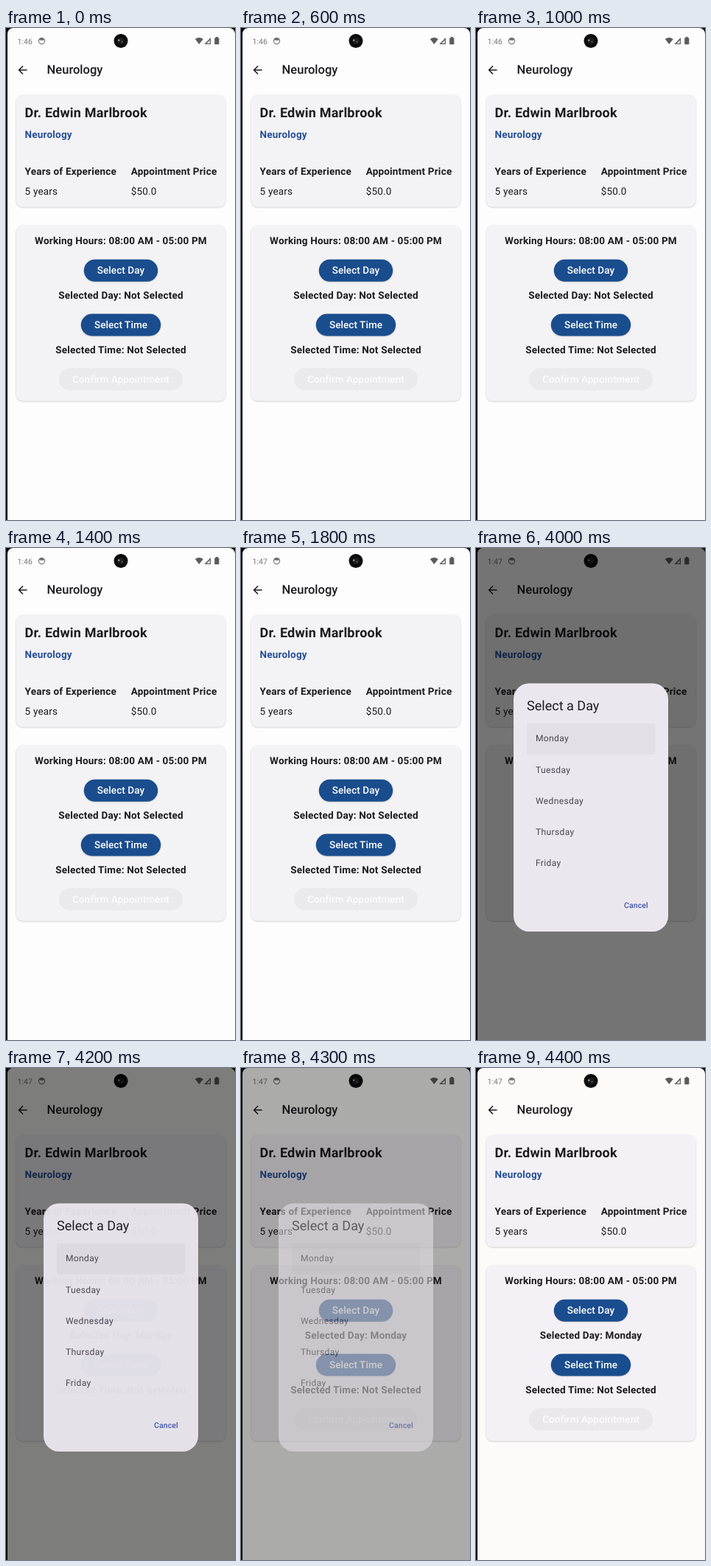
An HTML page with a canvas for the animation above (5600 ms loop, 311 px wide and 667 px high).

```html
<!DOCTYPE html>
<html lang="en">
<head>
<meta charset="utf-8">
<title>Appointment booking</title>
<style>
html, body { margin: 0; width: 100%; height: 100%; overflow: hidden; background: #000; }
canvas { display: block; width: 311px; height: 667px; }
</style>
</head>
<body>
<canvas id="stage"></canvas>
<script>
const W = 311, H = 667, LOOP = 5600;
const U = 0.752; // stage pixels per layout unit
const dpr = window.devicePixelRatio || 1;
const DAYS = ['Monday', 'Tuesday', 'Wednesday', 'Thursday', 'Friday'];
const ARROW = new Path2D('M20 11H7.83l5.59-5.59L12 4l-8 8 8 8 1.41-1.41L7.83 13H20v-2z');

function setup(canvas) {
  canvas.width = Math.round(W * dpr);
  canvas.height = Math.round(H * dpr);
  const c = canvas.getContext('2d');
  c.scale(dpr, dpr);
  c.textRendering = 'geometricPrecision';
  return c;
}

const stage = setup(document.getElementById('stage'));
const layer = document.createElement('canvas');
const sheet = setup(layer);

function text(c, str, x, y, size, color, { weight = 500, gap = 0, align = 'left' } = {}) {
  c.font = `${weight} ${size * U}px Roboto, sans-serif`;
  c.letterSpacing = gap * U + 'px';
  c.textAlign = align;
  c.fillStyle = color;
  c.fillText(str, x, y);
}

function box(c, x, y, w, h, r, color) {
  c.fillStyle = color;
  c.beginPath();
  c.roundRect(x, y, w, h, r);
  c.fill();
}

function raised(c, x, y, w, h, r, color) {
  c.save();
  c.shadowColor = 'rgba(0,0,0,0.2)';
  c.shadowBlur = 1.6 * dpr;
  c.shadowOffsetY = 0.8 * dpr;
  box(c, x, y, w, h, r, color);
  c.restore();
}

function disc(c, x, y, r, color) {
  c.fillStyle = color;
  c.beginPath();
  c.arc(x, y, r, 0, Math.PI * 2);
  c.fill();
}

function poly(c, color, ...pts) {
  c.fillStyle = color;
  c.beginPath();
  pts.forEach(([x, y]) => c.lineTo(x, y));
  c.fill();
}

function statusBar(c, clock) {
  const ink = '#5c5c5c';
  text(c, clock, 15.6, 22, 14, '#777', { weight: 400 });

  c.strokeStyle = '#707070';
  c.lineWidth = 1.1;
  c.beginPath();
  c.arc(48.5, 17.6, 4.1, 0, Math.PI * 2);
  c.stroke();
  box(c, 45.2, 14, 6.6, 2.8, 1.2, '#707070');

  disc(c, 156, 17.5, 9.5, '#0b0b0c');
  disc(c, 156, 17.5, 4.6, '#1d1d20');
  disc(c, 153.2, 16.6, 1.2, '#aaa');
  disc(c, 157.6, 18.6, 0.9, '#777');

  c.fillStyle = ink;
  c.beginPath();
  c.moveTo(262.3, 22);
  c.lineTo(256.8, 15);
  c.quadraticCurveTo(262.3, 11, 267.8, 15);
  c.fill();

  poly(c, ink, [269.3, 22], [278, 13], [278, 22]);
  poly(c, '#e8e8e8', [272.4, 21], [276.9, 16.2], [276.9, 21]);

  box(c, 283.2, 13.2, 6.2, 9, 0.8, ink);
  box(c, 284.9, 12.1, 2.8, 2, 0.3, ink);
}

function button(c, label, x, y, w) {
  raised(c, x, y, w, 30, 15, '#1a4d8e');
  text(c, label, 156, Math.floor(y + 19.6), 18, '#fff', { gap: 0.1, align: 'center' });
}

function page(c, { clock, day, back, card }) {
  const ink = '#1c1b1f';
  const body = { weight: 600, gap: 0.25 };
  const mid = { ...body, align: 'center' };
  const plain = { weight: 400, gap: 0.25 };

  c.fillStyle = back;
  c.fillRect(0, 0, W, H);
  statusBar(c, clock);

  c.save();
  c.translate(13.5, 48);
  c.scale(U, U);
  c.fillStyle = ink;
  c.fill(ARROW);
  c.restore();
  text(c, 'Neurology', 55.6, 62, 22, ink);

  raised(c, 13.5, 90.5, 285, 152.3, 9, card);
  text(c, 'Dr. Edwin Marlbrook', 25.6, 121, 24, ink, body);
  text(c, 'Neurology', 25.6, 149, 18, '#264f98', body);
  text(c, 'Years of Experience', 25.6, 199, 18, ink, body);
  text(c, 'Appointment Price', 169.7, 199, 18, ink, body);
  text(c, '5 years', 25.6, 226, 18, ink, plain);
  text(c, '$50.0', 169.7, 226, 18, ink, plain);

  raised(c, 13.5, 267.3, 285, 238.5, 9, card);
  text(c, 'Working Hours: 08:00 AM - 05:00 PM', 156, 293, 18, ink, mid);
  button(c, 'Select Day', 105.8, 313.8, 100.4);
  text(c, 'Selected Day: ' + day, 156, 367, 18, ink, mid);
  button(c, 'Select Time', 101.8, 387.5, 108.4);
  text(c, 'Selected Time: Not Selected', 156, 441, 18, ink, mid);
  box(c, 72, 461.2, 168, 30, 15, 'rgba(28,27,31,0.045)');
  text(c, 'Confirm Appointment', 156, 481, 18, '#fcfcfc', { gap: 0.1, align: 'center' });
}

function dialog(c, pressed) {
  c.clearRect(0, 0, W, H);
  box(c, 51, 183.5, 210, 336.5, 21, '#ebe7ef');
  if (pressed) box(c, 69, 238, 174.5, 41.5, 0, '#e3dfe6');
  text(c, 'Select a Day', 69, 220, 24, '#1d1b20', { weight: 400 });
  DAYS.forEach((d, i) =>
    text(c, d, 81, 262.4 + i * 42.1, 16, '#49454f', { weight: 400, gap: 0.5 }));
  text(c, 'Cancel', 201, 488, 14, '#4156ab', { gap: 0.1 });
}

// Scrim and dialog opacity; the dialog fades out in held steps.
function overlay(t) {
  if (t < 1900 || t >= 4400) return [0, 0];
  if (t < 4200) return [0.54, 1];
  return t < 4300 ? [0.5, 0.95] : [0.32, 0.53];
}

function draw(now) {
  const t = now % LOOP;
  const c = stage;
  const late = t >= 4200;
  const [scrim, fade] = overlay(t);

  c.fillStyle = '#050505';
  c.fillRect(0, 0, W, H);
  c.save();
  c.beginPath();
  c.roundRect(2, 0, W - 2, H, [8, 8, 0, 0]);
  c.clip();
  page(c, {
    clock: t < 1800 ? '1:46' : '1:47',
    day: late ? 'Monday' : 'Not Selected',
    back: late ? '#fcfbf9' : '#fdfdfd',
    card: late ? '#f4f1f6' : '#f3f2f4'
  });
  if (fade) {
    c.fillStyle = `rgba(0,0,0,${scrim})`;
    c.fillRect(0, 0, W, H);
    dialog(sheet, t >= 4000);
    c.globalAlpha = fade;
    c.drawImage(layer, 0, 0, W, H);
  }
  c.restore();
}

const start = performance.now();
function tick() {
  draw(performance.now() - start);
  requestAnimationFrame(tick);
}
tick();
</script>
</body>
</html>
```
